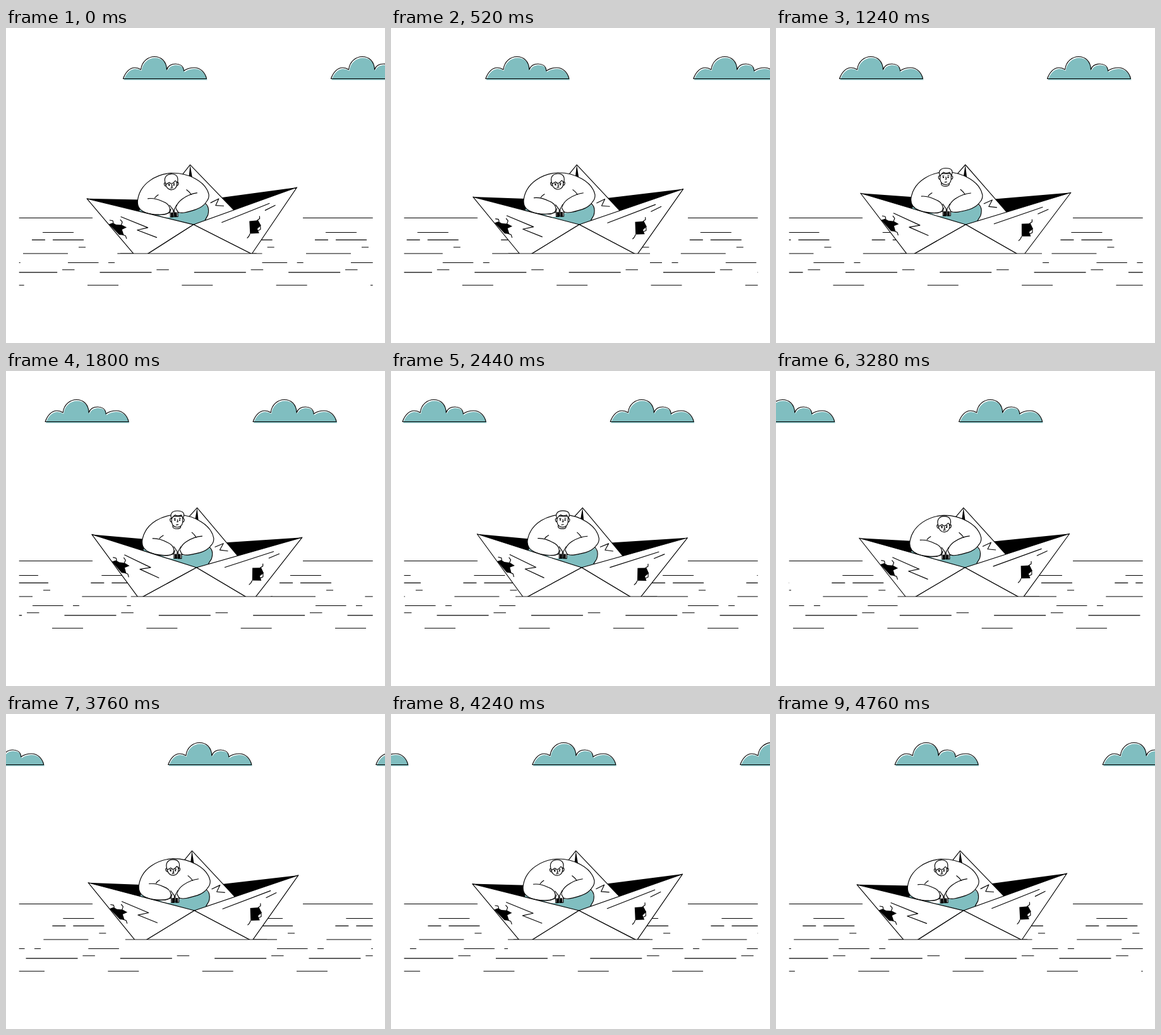
These frames come from a looping animation (600x500 px, 4800 ms). An HTML page:

```html
<!DOCTYPE html>
<html lang="en">
<head>
<meta charset="utf-8">
<title>Paper boat</title>
<style>
  html, body { margin: 0; width: 100%; height: 100%; overflow: hidden; background: #fff; }
  svg { display: block; width: 600px; height: 500px; }
  .line { fill: none; stroke: #000; stroke-width: 1.15; stroke-linejoin: round; }
  .thin { stroke-width: .9; }
  .paper { fill: #fff; }
  .teal { fill: #80bec0; }
  .ink { fill: #000; }
</style>
</head>
<body>
<svg viewBox="0 0 600 500">
  <defs>
    <clipPath id="sea"><rect x="20.7" y="290" width="560" height="130"/></clipPath>
    <path id="puff" d="M.5 80.5C4 70 11 63 19 63Q24 63 28.500 66C30 53 40 45.500 50 45.500C61 45.500 69 53 69.500 66C72 59 78 57 83.500 57C90 57 96 60 96.500 68C102 64 108 63 113 63C123 63 130.500 71 132.500 80.500Z"/>
    <g id="cloud">
      <use href="#puff" class="teal" x="1" y="2"/>
      <use href="#puff" class="line"/>
    </g>
  </defs>

  <g id="clouds">
    <use href="#cloud" x="-329"/><use href="#cloud"/><use href="#cloud" x="329"/>
  </g>
  <path class="line" d="M20.700 301.500H137M470 301.500H580.700"/>
  <g clip-path="url(#sea)"><path id="waves" class="line"/></g>

  <g id="boat">
    <path class="ink" d="M134 262L217 268V288ZM467 261.500L346 271.500L365.500 293Z"/>
    <path class="line paper" d="M300 217L366 293L300.500 312L250 290L286 233Z"/>
    <path class="ink" d="M300 217L297 236L302.500 238Z"/>

    <path class="paper" d="M215 290Q216 280 222 278H316Q327 284 325 297L319 307L300 312Z"/>
    <path class="teal" d="M215 290Q216 282 222 280Q228 291 245 293Q255 300 264 298L277 293Q300 293 321 281Q327 287 324 298L319 308L300 313Z"/>
    <path class="line" d="M214.500 289Q216 282 219 280M320 279Q328 285 324 298L319 306"/>

    <path class="line paper" d="M226 289C216 285 212 278 214.500 267C220 242 246 229 269 228.500C296 229 323 244 327 265C328 275 320 281 304 288L276 292L270 289L256 293.500C245 294 234 293 226 289Z"/>
    <path class="line paper" d="M230 267Q241 266 254 273C264 277 266 285 263 290C258 296 235 293 226 289"/>
    <path class="line paper" d="M309 262Q296 263 284 271C274 278 272 287 276 290C281 295 295 291 306 288Q316 285 322 278"/>
    <path class="line" d="M247.500 261.500Q243 264 241 267M292 256Q297 260 299.500 264.500"/>
    <path class="line paper" d="M264 279L269.500 287V298H264.500V290L266 285M275.500 279L271 287V298H276.500V290L274 285"/>
    <path class="ink" d="M265.500 291H269V298.500H265.500ZM271.500 291H275V298.500H271.500Z"/>
    <path class="line paper" d="M262 245V248Q263 251 268 251Q274 251 274.500 248V245"/>
    <path id="face" class="line paper"/>
    <path id="hair" class="line paper"/>
    <path id="look" class="line"/>
    <path id="eyes" class="ink"/>

    <path class="line paper" d="M134 262L300.500 312L210.600 363ZM467 261.500L300.500 312L390 363.400Z"/>
    <path class="line paper" d="M300.500 312L210.600 363L390 363.400Z"/>
    <path class="line" d="M186 293.500L228 313L211 316L241.500 329.500M345 311L422.500 284.500M414.500 295.500L431.500 288"/>
    <path class="line" d="M329 279L342.500 273L337 283.500L350 285"/>
    <path class="ink" d="M166.500 304.500L173 302.500L178 305.500L187 306.500L194.500 311L187 314L189.500 323L182 322Z"/>
    <path class="ink" d="M389 311L403 310.500L407 319L401 324L403.500 331L389 331Z"/>
    <path class="line" d="M168 298L173 299L174 303M185 298L188 302L186 307M187 322L192 324L193.500 329M401 311L405.500 308V304M406 318V325L402 327M389 331L387 335L384 338"/>
  </g>

  <g id="water">
    <rect class="paper" x="196.500" y="358" width="224.500" height="20"/>
    <path class="line thin" d="M196.500 358H421"/>
  </g>
</svg>
<script>
const LOOP = 4800, STEP = 40, SWELL = 448 / 3, CLOUD_GAP = 329;
const $ = id => document.getElementById(id);

// y, then start and length of each dash in one repeat
const rows = [
  [324.5, 58, 49], [336.3, 41, 21, 74, 49], [348, 115, 11], [358, 27, 71],
  [372.5, 98, 48.5, 162, 10], [383.7, 89, 19.5], [387.8, 148.5, 82], [408.2, 129, 49]
];
let dashes = '';
for (const [y, ...parts] of rows)
  for (let i = 0; i < parts.length; i += 2)
    for (let k = -2; k < 6; k++)
      dashes += `M${parts[i] + k * SWELL} ${y}h${parts[i + 1]}`;
$('waves').setAttribute('d', dashes);

const tilt = [[0, -3], [520, -2.07], [1240, -.09], [2100, 1.27], [2440, 1.13],
  [3280, -1.12], [4240, -2.58], [4800, -3]];
const drift = [[0, -15.5], [520, -11], [1240, 0], [1840, 1.2], [2440, .5],
  [3280, -4], [4240, -11.5], [4800, -15.5]];

// Smooth curve through the keys, at rest at both ends
function curve(keys, t) {
  const slope = i => keys[i - 1] && keys[i + 1]
    ? (keys[i + 1][1] - keys[i - 1][1]) / (keys[i + 1][0] - keys[i - 1][0]) : 0;
  let i = 0;
  while (i < keys.length - 2 && t >= keys[i + 1][0]) i++;
  const [t0, a] = keys[i], [t1, b] = keys[i + 1], h = t1 - t0, u = (t - t0) / h;
  const s = u * u * (3 - 2 * u);
  return a + (b - a) * s + h * u * (1 - u) * (slope(i) * (1 - u) - slope(i + 1) * u);
}

function ease(t, from, to) {
  const u = Math.min(1, Math.max(0, (t - from) / (to - from)));
  return u * u * (3 - 2 * u);
}

function drawHead(up) {
  const m = (low, high) => (low + (high - low) * up).toFixed(2);
  const ear = m(243.5, 235), top = m(230, 222.5), chin = m(255, 248.5);
  $('face').setAttribute('d',
    `M260 ${ear}q-3 -1 -2.500 2.500q1 3.500 3 2.500M277.500 ${ear}q3 -1 2.500 2.500q-1 3.500 -3 2.500` +
    `M260 ${m(240, 231)}V${m(247, 240)}C261 ${m(252, 246)} 265 ${chin} 269 ${chin}` +
    `C273 ${chin} 277 ${m(252, 246)} 277.500 ${m(247, 240)}V${m(240, 231)}Z`);
  $('hair').setAttribute('d',
    `M260 ${m(246, 235)}C256.500 ${m(237, 228)} 260 ${top} 269 ${top}` +
    `C279 ${top} 281 ${m(237, 227)} 278 ${m(245, 234)}` +
    `Q276.500 ${m(241, 231)} 275 ${m(241, 229)}Q271 ${m(246, 231)} 268 ${m(245, 230)}` +
    `L265.500 ${m(243, 229)}Q262 ${m(245, 231)} 260 ${m(246, 235)}Z`);
  $('look').setAttribute('d',
    `M269 ${m(246, 236)}l1 4h-2M267 ${m(252.500, 245)}q2 -1 4 -.500` +
    `M263.500 ${m(246, 235)}l3 -.500M271.500 ${m(245, 234)}l3 .500`);
  const y = m(247.500, 237);
  $('eyes').setAttribute('d',
    `M264 ${y}a1.200 1.200 0 1 0 2.400 0a1.200 1.200 0 1 0 -2.400 0` +
    `M271.500 ${y}a1.200 1.200 0 1 0 2.400 0a1.200 1.200 0 1 0 -2.400 0`);
}

function slide(id, x) { $(id).setAttribute('transform', `translate(${x} 0)`); }

function draw(now) {
  const t = Math.floor(now % LOOP / STEP) * STEP, u = t / LOOP;
  slide('clouds', 185 - CLOUD_GAP * u + (u > .6 ? CLOUD_GAP : 0));
  slide('waves', -SWELL * u);
  slide('water', curve(drift, t));
  $('boat').setAttribute('transform', `rotate(${curve(tilt, t)} 300 380)`);
  drawHead(ease(t, 700, 1160) - ease(t, 2700, 3160));
}

let start;
function tick(now) {
  start ??= now;
  draw(now - start);
  requestAnimationFrame(tick);
}
draw(0);
requestAnimationFrame(tick);
</script>
</body>
</html>
```
